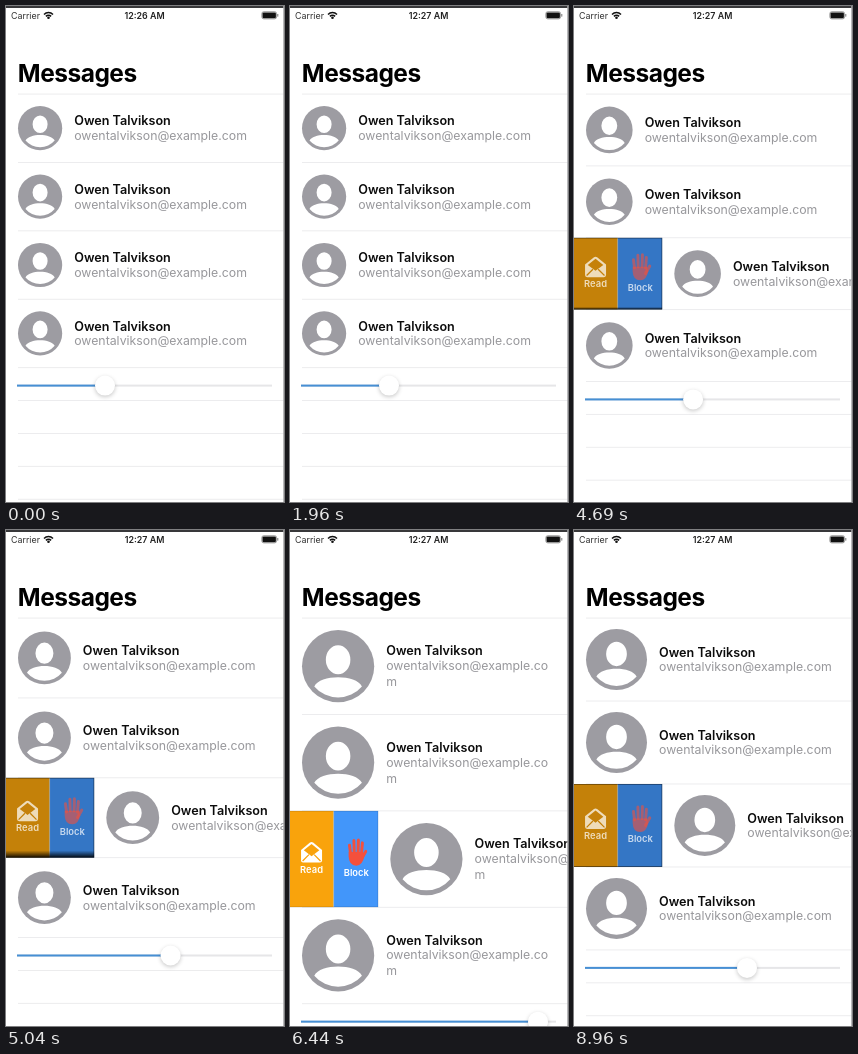
Recreate the animation shown at these times as an HTML page with a canvas. Size 278x496 px, loop 9030 ms.

```html
<!DOCTYPE html>
<html lang="en">
<head>
<meta charset="utf-8">
<title>Messages</title>
<style>
html, body { margin: 0; width: 278px; height: 496px; overflow: hidden; background: #fff; }
canvas { display: block; width: 278px; height: 496px; }
</style>
</head>
<body>
<canvas id="stage"></canvas>
<script>
const W = 278, H = 496, LOOP = 9030, TOP = 88;
const NAME = 'Owen Talvikson', MAIL = 'owentalvikson@example.com';
const canvas = document.getElementById('stage');
const g = canvas.getContext('2d');
const dpr = window.devicePixelRatio || 1;
canvas.width = W * dpr;
canvas.height = H * dpr;

const person = new Path2D(
  'M-34-18a34 40 0 1 0 68 0a34 40 0 1 0-68 0z' +
  'M-66 56C-50 22 50 22 66 56A86.6 86.6 0 0 1-66 56z');
const envelope = new Path2D('M-10-2L-1.5-9Q0-10 1.5-9L10-2V8Q10 10 8 10H-8Q-10 10-10 8z');
const letter = new Path2D('M-7.4-1.6L0-7.6L7.4-1.6L0 4z');
const creases = new Path2D('M-8.5 8.5L-2.5 2.5M8.5 8.5L2.5 2.5');
const fingers = new Path2D('M-5.5 1L-6.5-6M-2 0L-2.3-10M1.7 0L2-10.5M5 1L5.8-8M5 6L9-.5');
const palm = new Path2D('M-7.3 0H6.5L7.5 4Q6 12 0 12Q-7 12-7.3 4z');

// Linear interpolation through time/value pairs.
function track(t, ...keys) {
  if (t <= keys[0]) return keys[1];
  for (let i = 2; i < keys.length; i += 2) {
    if (t < keys[i]) {
      const p = (t - keys[i - 2]) / (keys[i] - keys[i - 2]);
      return keys[i - 1] + (keys[i + 1] - keys[i - 1]) * p;
    }
  }
  return keys[keys.length - 1];
}

const knobX = t => track(t, 4270, 99, 4690, 119, 5460, 219, 6020, 248, 8190, 248, 8330, 238, 8960, 173);
const heightFor = x => 68.4 + (x - 99) * 0.188;
const dimming = t => track(t, 4270, 0, 4500, 1, 5800, 1, 6020, 0, 8330, 0, 8540, 1);

function swipe(t) {
  const p = track(t, 2960, 0, 3780, 1);
  return 88.3 * p * p * (3 - 2 * p);
}

function rect(x, y, w, h, color) {
  g.fillStyle = color;
  g.fillRect(x, y, w, h);
}

function text(str, x, y, size, weight, color, align = 'left') {
  g.font = `${weight} ${size}px Inter, Roboto, sans-serif`;
  g.textAlign = align;
  g.fillStyle = color;
  g.fillText(str, x, y);
}

function disc(x, y, r, color) {
  g.fillStyle = color;
  g.beginPath();
  g.arc(x, y, r, 0, 7);
  g.fill();
}

function at(x, y, scale, draw) {
  g.save();
  g.translate(x, y);
  g.scale(scale, scale);
  draw();
  g.restore();
}

function separator(y) {
  rect(12, y - 0.4, W - 12, 0.9, '#eaeaec');
}

function statusBar(t) {
  text('Carrier', 5, 13, 8.9, 400, '#333');
  text(t < 1540 ? '12:26 AM' : '12:27 AM', 138.5, 13, 8.9, 600, '#222', 'center');
  g.strokeStyle = '#111';
  g.lineWidth = 1.5;
  for (const r of [3.7, 6.4]) {
    g.beginPath();
    g.arc(42.5, 13, r, -2.35, -0.79);
    g.stroke();
  }
  disc(42.5, 11.8, 1.3, '#111');
  g.lineWidth = 0.7;
  g.strokeStyle = '#777';
  g.beginPath();
  g.roundRect(255.8, 5.7, 14.8, 7.2, 2);
  g.stroke();
  g.fillStyle = '#111';
  g.beginPath();
  g.roundRect(256.5, 6.4, 13.4, 5.8, 1.2);
  g.fill();
  rect(271.3, 8, 1, 2.6, '#777');
}

function row(x, middle, size) {
  const r = size / 2, left = x + 24 + size;
  disc(x + 12 + r, middle, r, '#9d9ca2');
  at(x + 12 + r, middle, r / 100, () => {
    g.fillStyle = '#fff';
    g.fill(person);
  });
  const wraps = size > 68.5, y = middle - (wraps ? 8 : 0);
  text(NAME, left, y - 2.8, 12.6, 600, '#0c0c0c');
  text(wraps ? MAIL.slice(0, -1) : MAIL, left, y + 12, 12.3, 400, '#98989c');
  if (wraps) text(MAIL.slice(-1), left, y + 28, 12.3, 400, '#98989c');
}

// One button; its icon and label fade a little while the row is dimmed.
function action(x, w, y, h, color, dim, label, labelY, icon) {
  const center = x + w - 22, middle = y + h / 2;
  rect(x, y, w, h, color);
  rect(x, y, w, h, `rgba(0,0,0,${0.21 * dim})`);
  g.globalAlpha = 1 - 0.28 * dim;
  at(center, middle - 7, 1.05, icon);
  text(label, center, middle + labelY, 9.4, 600, '#fff', 'center');
  g.globalAlpha = 1;
}

function actions(open, y, h, dim, edge) {
  const half = open / 2 - 0.6;
  g.save();
  g.beginPath();
  g.rect(0, y, open, h);
  g.clip();

  action(0, open, y, h, '#4296fa', dim, 'Block', 17, () => {
    g.globalAlpha = 1 - 0.42 * dim;
    g.strokeStyle = g.fillStyle = '#f4503c';
    g.lineWidth = 2.8;
    g.lineCap = 'round';
    g.scale(1, 1.08);
    g.stroke(fingers);
    g.fill(palm);
  });
  action(0, half, y, h, '#f9a30c', dim, 'Read', 13.8, () => {
    g.fillStyle = '#fff';
    g.fill(envelope);
    g.globalAlpha = 1;
    g.fillStyle = g.strokeStyle = dim > 0.5 ? '#c5810a' : '#f9a30c';
    g.fill(letter);
    g.lineWidth = 1.2;
    g.stroke(creases);
  });
  rect(half - 0.6, y, 1.2, h, 'rgba(255,255,255,.25)');

  if (edge > 0) {
    const shade = g.createLinearGradient(0, y + h - edge, 0, y + h);
    shade.addColorStop(0, 'rgba(0,0,0,0)');
    shade.addColorStop(1, 'rgba(0,0,0,.9)');
    rect(0, y + h - edge, open, edge, shade);
  }
  g.strokeStyle = `rgba(0,0,0,${0.15 + 0.35 * dim})`;
  g.lineWidth = 1.6;
  g.strokeRect(-2, y, open + 2, h);
  g.restore();
}

function slider(x, y) {
  rect(11, y - 1, 255, 2, '#e6e6e8');
  rect(11, y - 1, x - 11, 2, '#468fd4');
  g.save();
  g.shadowColor = 'rgba(0,0,0,.22)';
  g.shadowBlur = 4 * dpr;
  g.shadowOffsetY = 1.5 * dpr;
  disc(x, y, 10, '#fff');
  g.restore();
}

function draw(t) {
  g.setTransform(dpr, 0, 0, dpr, 0, 0);
  rect(0, 0, W, H, '#fff');
  statusBar(t);
  g.letterSpacing = '-0.5px';
  text('Messages', 11.8, 76, 24.5, 700, '#000');
  g.letterSpacing = '0px';

  // Avatars trail slightly behind the row height while the slider moves.
  const h = heightFor(knobX(t - 35));
  const size = heightFor(knobX(t - 150)) - 24.2;
  const open = swipe(t), end = TOP + 4 * h;
  for (let i = 0; i < 4; i++) {
    const y = TOP + i * h;
    separator(y);
    row(i === 2 ? open : 0, y + h / 2, size);
  }
  for (let y = end; y < H; y += 32.9) separator(y);
  if (open > 0) actions(open, TOP + 2 * h, h, dimming(t), 2.5 * (h - size - 24.2));
  slider(knobX(t), end + 18);

  rect(0, 0, W, 2, '#38383a');
  rect(W - 0.8, 0, 0.8, H, '#a8a8aa');
}

const start = performance.now();
function tick() {
  draw((performance.now() - start) % LOOP);
  requestAnimationFrame(tick);
}
tick();
</script>
</body>
</html>
```
